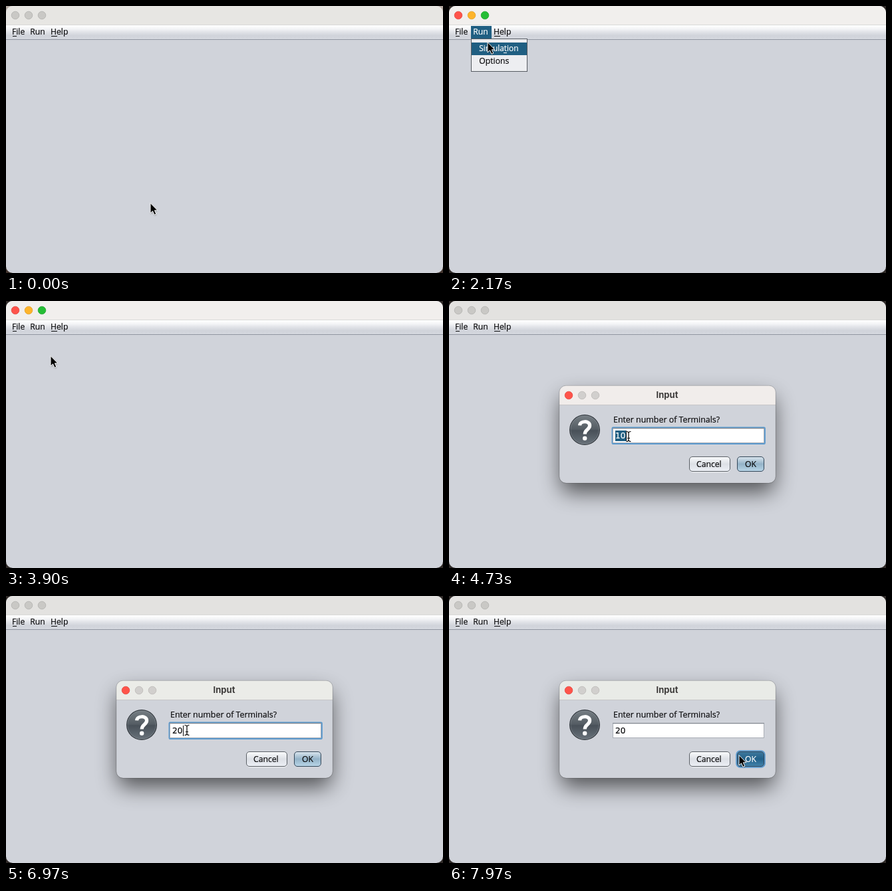
An HTML page for the animation above (8 s loop, 657 by 402 pixels).

```html
<!DOCTYPE html>
<html lang="en">
<head>
<meta charset="utf-8">
<title>Terminal input</title>
<style>
  html, body { margin: 0; width: 100%; height: 100%; overflow: hidden; background: #38312d; }
  svg { display: block; width: 100%; height: 100%; }
  text { font: 12.2px "Open Sans", "Noto Sans", sans-serif; fill: #0b0b0d; stroke: #0b0b0d; stroke-width: .2px; white-space: pre; }
  text.on { fill: #fff; stroke: #fff; }
  text.prompt { font-size: 12.4px; }
  text.number { font: 12px "DejaVu Sans", sans-serif; }
  text.title { font: 700 13px Inter, sans-serif; fill: #3d3b3a; stroke: none; }
  .line { fill: #0b0b0d; }
  .line.on { fill: #fff; }
  .accent { fill: #205f82; }
</style>
</head>
<body>
<svg viewBox="0 0 657 402" preserveAspectRatio="none">
  <defs>
    <linearGradient id="menuBar" x2="0" y2="1">
      <stop offset="0" stop-color="#fff"/><stop offset=".25" stop-color="#f4f5f7"/>
      <stop offset=".5" stop-color="#e0e2e7"/><stop offset=".75" stop-color="#d0d3da"/>
      <stop offset="1" stop-color="#d5d8df"/>
    </linearGradient>
    <linearGradient id="plain" x2="0" y2="1">
      <stop offset="0" stop-color="#fafbfc"/><stop offset=".5" stop-color="#dde0e6"/>
      <stop offset="1" stop-color="#eceff5"/>
    </linearGradient>
    <linearGradient id="default" x2="0" y2="1">
      <stop offset="0" stop-color="#dbe6ee"/><stop offset=".5" stop-color="#94b3c8"/>
      <stop offset="1" stop-color="#b9d6e8"/>
    </linearGradient>
    <linearGradient id="pressed" x2="0" y2="1">
      <stop offset="0" stop-color="#3f789c"/><stop offset=".5" stop-color="#22618a"/>
      <stop offset="1" stop-color="#4483aa"/>
    </linearGradient>
    <linearGradient id="badge" x2="0" y2="1">
      <stop offset="0" stop-color="#767e84"/><stop offset=".48" stop-color="#555d64"/>
      <stop offset=".52" stop-color="#485058"/><stop offset="1" stop-color="#69727a"/>
    </linearGradient>
    <linearGradient id="dayCorner" x2="0" y2="1">
      <stop offset="0" stop-color="#b2a8a1"/><stop offset=".5" stop-color="#8b7a70"/>
      <stop offset="1" stop-color="#40332d"/>
    </linearGradient>
    <filter id="blur" x="-40%" y="-60%" width="180%" height="220%"><feGaussianBlur stdDeviation="16"/></filter>
    <filter id="soft" x="-50%" y="-50%" width="200%" height="200%"><feGaussianBlur stdDeviation=".8"/></filter>
    <clipPath id="window"><rect width="657" height="402" rx="10"/></clipPath>
    <clipPath id="panel"><rect x="166" y="127.5" width="325" height="146.5" rx="10"/></clipPath>
  </defs>

  <rect id="backdrop" width="657" height="402"/>
  <g clip-path="url(#window)">
    <rect width="657" height="402" fill="#d0d3da"/>
    <rect id="bar" width="657" height="28"/>
    <rect y="28" width="657" height="1" fill="#d9d9d8"/>
    <rect y="29" width="657" height="21" fill="url(#menuBar)"/>
    <rect y="50" width="657" height="1" fill="#9095a0"/>
    <g id="lights" stroke-width=".8">
      <circle cx="14" cy="14" r="5.8"/><circle cx="34" cy="14" r="5.8"/><circle cx="54" cy="14" r="5.8"/>
    </g>
    <rect id="runBack" class="accent" x="33" y="30" width="31" height="20"/>
    <text x="9" y="43">File</text><rect class="line" x="10" y="45" width="6" height="1"/>
    <text id="run" x="36.3" y="43">Run</text>
    <text x="67" y="43">Help</text><rect class="line" x="68" y="45" width="9" height="1"/>
  </g>

  <g id="menu">
    <rect x="33.5" y="49.5" width="84" height="49" fill="#edeef1" stroke="#565b62"/>
    <rect id="pick" class="accent" x="34" width="83" height="19"/>
    <text id="sim" x="45.3" y="68" style="font-size:11.9px">Simulation</text>
    <rect id="simLine" class="line" x="82" y="70" width="5" height="1"/>
    <text id="opt" x="45.3" y="87">Options</text>
  </g>

  <g id="dialog">
    <rect x="168" y="144" width="321" height="144" rx="12" fill="#000" opacity=".6" filter="url(#blur)"/>
    <g clip-path="url(#panel)">
      <rect x="166" y="127" width="325" height="148" fill="#d0d3da"/>
      <rect id="panelBar" x="166" y="127" width="325" height="29"/>
      <rect x="166" y="156" width="325" height="1" fill="#c6c5c7"/>
    </g>
    <rect x="165.8" y="127.3" width="325.4" height="147" rx="10" fill="none" stroke="#000" stroke-opacity=".25" stroke-width=".7"/>
    <g stroke-width=".8">
      <circle cx="180" cy="142" r="5.8" fill="#fe544b" stroke="#e4473f"/>
      <circle cx="200" cy="142" r="5.8" fill="#d1cfcd" stroke="#bbb9b7"/>
      <circle cx="220" cy="142" r="5.8" fill="#d1cfcd" stroke="#bbb9b7"/>
    </g>
    <text class="title" x="328" y="146.3" text-anchor="middle">Input</text>

    <circle cx="204" cy="194.5" r="23" fill="#e4e6ea" opacity=".7"/>
    <circle cx="204" cy="194" r="22.4" fill="url(#badge)" stroke="#343a40" stroke-width="1.2"/>
    <circle cx="204" cy="194" r="21.2" fill="none" stroke="#9299a0" stroke-opacity=".5" stroke-width=".8"/>
    <path d="M196.6 187.4C197 180 211.6 179.6 211.6 187.6C211.6 193.8 204.2 193.2 204.2 200.5" fill="none" stroke="#fff" stroke-width="5.2"/>
    <circle cx="204.2" cy="206.8" r="3.2" fill="#fff"/>

    <text class="prompt" x="247" y="183">Enter number of Terminals?</text>
    <rect id="ring" x="245.7" y="190.7" width="229" height="24" rx="1" fill="none" stroke="#5c9bcf" stroke-width="2.4"/>
    <rect x="246.5" y="191.5" width="227" height="22" fill="#fff" stroke="#a9adb5"/>
    <rect x="246" y="191" width="228" height="1" fill="#858a92"/>
    <rect x="247" y="192" width="226" height="1" fill="#d5d8dc"/>
    <rect id="mark" class="accent" x="250" y="195" width="16.5" height="16"/>
    <text id="value" class="number" x="250" y="207"></text>
    <rect id="caret" class="line" y="195" width="1" height="16"/>

    <rect x="362" y="236" width="61" height="22.5" rx="5" fill="#fff" opacity=".5"/>
    <rect x="361.5" y="234.5" width="61" height="22" rx="4.5" fill="url(#plain)" stroke="#5c6167"/>
    <text x="372" y="250">Cancel</text>
    <rect id="okRing" x="432.3" y="233.3" width="42.4" height="24.4" rx="5.5" fill="none" stroke="#5c9bcf" stroke-width="2.2"/>
    <rect id="okBox" x="433.5" y="234.5" width="40" height="22" rx="4.5" stroke="#34485a"/>
    <text id="ok" x="453.5" y="250" text-anchor="middle">OK</text>
  </g>

  <g id="arrow">
    <path d="M0 0V15L3.5 11.8L6 17.4L8.8 16.1L6.4 10.8H11Z" fill="#000" opacity=".35" filter="url(#soft)" transform="translate(.3 1.2)"/>
    <path d="M0 -.4V15L3.5 11.8L6 17.4L8.8 16.1L6.4 10.8H11Z" fill="#000" stroke="#fff" stroke-width="1"/>
  </g>
  <g id="beam" fill="none">
    <path d="M-3.5 -7.5Q0 -7.5 0 -5V5Q0 7.5 -3.5 7.5M3.5 -7.5Q0 -7.5 0 -5M0 5Q0 7.5 3.5 7.5M-2 2.5H2" stroke="#fff" stroke-width="2.6" opacity=".8"/>
    <path d="M-3.5 -7.5Q0 -7.5 0 -5V5Q0 7.5 -3.5 7.5M3.5 -7.5Q0 -7.5 0 -5M0 5Q0 7.5 3.5 7.5M-2 2.5H2" stroke="#000" stroke-width="1.2"/>
  </g>
</svg>
<script>
const LOOP = 8000;
const ACTIVATE = 1330, CHOOSE = 3850, OPEN = 4000, TYPE = 5650, TYPE_NEXT = 5900, PRESS = 7880;

// Pointer stops: time, x, y
const route = [
  [0, 217, 297], [270, 217, 297], [1030, 52, 46], [1150, 49, 41], [1850, 49, 41],
  [2170, 58, 55], [2600, 67, 82], [2970, 67, 82], [3030, 67, 83], [3900, 67, 83],
  [4620, 270, 204], [5200, 270, 204], [5700, 272, 202], [7130, 272, 202], [7760, 436, 240], [LOOP, 436, 240]
];

const el = {};
document.querySelectorAll("[id]").forEach(node => { el[node.id] = node; });
const lights = [...el.lights.children];
const lit = [["#fe544b", "#e4473f"], ["#fdb42b", "#e2a024"], ["#25bd35", "#1fa52d"]];
const dim = ["#c9c8c5", "#b2b1af"];

const set = (node, attrs) => { for (const key in attrs) node.setAttribute(key, attrs[key]); };
const show = (node, on) => set(node, { visibility: on ? "visible" : "hidden" });
const light = (node, on) => node.classList.toggle("on", on);
const mix = (a, b, k) => a + (b - a) * k;
const clamp = v => Math.max(0, Math.min(1, v));
const ease = k => k * k * (3 - 2 * k);
const blend = (a, b, k) => `rgb(${a.map((v, i) => Math.round(mix(v, b[i], k)))})`;

function pointerAt(t) {
  const i = Math.max(1, route.findIndex(stop => stop[0] > t));
  const [t0, x0, y0] = route[i - 1], [t1, x1, y1] = route[i];
  const k = ease((t - t0) / (t1 - t0));
  return [mix(x0, x1, k), mix(y0, y1, k)];
}

function drawWindow(t) {
  const active = t >= ACTIVATE && t < OPEN;
  set(el.backdrop, { fill: t < ACTIVATE ? "url(#dayCorner)" : "#2f2a28" });
  set(el.bar, { fill: active ? "#f1efed" : t < ACTIVATE ? "#e7e6e3" : "#e3e2e0" });
  lights.forEach((dot, i) => {
    const [fill, stroke] = active ? lit[i] : dim;
    set(dot, { fill, stroke });
  });
}

function drawMenu(t, y) {
  const open = t >= ACTIVATE && t < CHOOSE;
  const onSim = open && y >= 54.5 && y < 74;
  const onOpt = open && y >= 74 && y < 93;
  show(el.runBack, open);
  show(el.menu, open);
  show(el.pick, onSim || onOpt);
  set(el.pick, { y: onOpt ? 74 : 55 });
  light(el.run, open);
  light(el.sim, onSim);
  light(el.simLine, onSim);
  light(el.opt, onOpt);
}

function drawDialog(t) {
  const open = t >= OPEN, pressed = t >= PRESS;
  const selected = t < TYPE, focused = !pressed;
  const blink = t < TYPE_NEXT || (t - TYPE_NEXT) % 1000 < 500;
  const value = selected ? "10" : t < TYPE_NEXT ? "2" : "20";
  show(el.dialog, open);
  set(el.panelBar, { fill: blend([241, 237, 235], [233, 235, 231], clamp((t - 4730) / 3240)) });
  show(el.ring, open && focused);
  show(el.mark, open && selected);
  el.value.textContent = value;
  light(el.value, selected);
  show(el.caret, open && focused && blink);
  set(el.caret, { x: value.length > 1 ? 266 : 258 });
  show(el.okRing, open && pressed);
  set(el.okBox, { fill: `url(#${pressed ? "pressed" : "default"})` });
  light(el.ok, pressed);
}

function drawPointer(t, x, y) {
  const inField = t >= OPEN && x > 247 && x < 473 && y > 191 && y < 214;
  const place = { transform: `translate(${x} ${y})` };
  set(el.arrow, place);
  set(el.beam, place);
  show(el.arrow, !inField);
  show(el.beam, inField);
}

function draw(t) {
  const [x, y] = pointerAt(t);
  drawWindow(t);
  drawMenu(t, y);
  drawDialog(t);
  drawPointer(t, x, y);
}

const start = performance.now();
function tick() {
  draw((performance.now() - start) % LOOP);
  requestAnimationFrame(tick);
}
tick();
</script>
</body>
</html>
```
